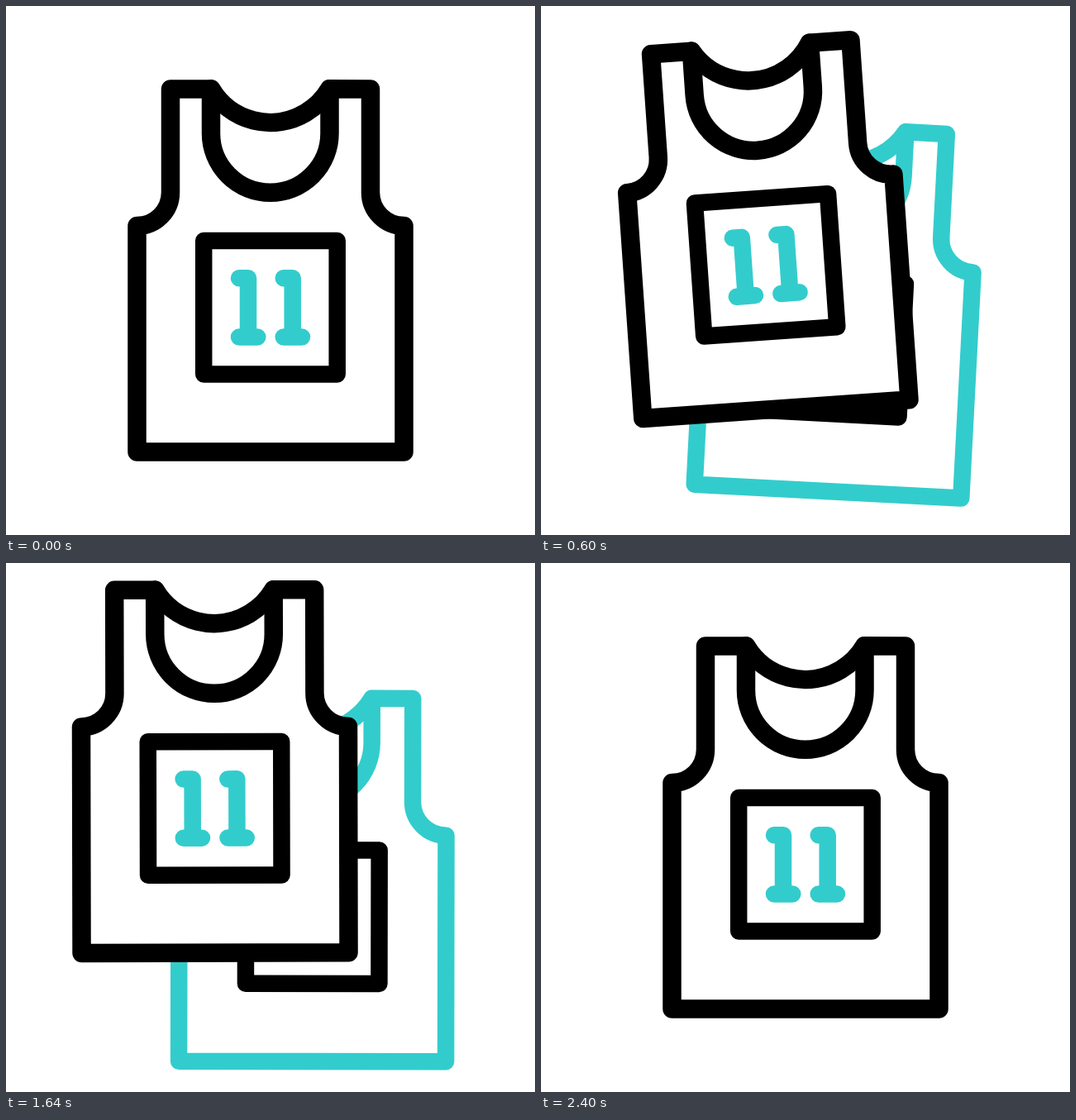
Animation of 640 by 640 pixels, one loop 2.8 s. Source, as an HTML page with a canvas:

```html
<!DOCTYPE html>
<html lang="en">
<head>
<meta charset="utf-8">
<title>Jerseys</title>
<style>
  html, body { margin: 0; width: 100%; height: 100%; overflow: hidden; background: #fff; }
  canvas { display: block; width: 100vmin; height: 100vmin; }
</style>
</head>
<body>
<canvas id="stage" width="640" height="640"></canvas>
<script>
const ctx = document.getElementById('stage').getContext('2d');
const TEAL = '#33cccc', BLACK = '#000';
const LOOP = 2800, STEP = 40, START = 200, MOVE = 800;

const front = { dx: -67.5, dy: -68, turn: -4, color: BLACK, width: 22.5, number: true };
const back = { dx: 51, dy: 63.5, turn: 3, color: TEAL, width: 20.5, number: false };

// Neckline: circular arc through both shoulder ends, 41 px deep.
const half = 71.75, depth = 41;
const neckR = (half * half + depth * depth) / (2 * depth);
const neckY = 141 - neckR;
const neckA = Math.atan2(100.5 - neckY, half);

const body = new Path2D();
body.moveTo(199, 100.5);
body.lineTo(248, 100.5);
body.arc(319.75, neckY, neckR, Math.PI - neckA, neckA, true);
body.lineTo(441, 100.5);
body.lineTo(441, 225.5);
body.arc(481.5, 225.5, 40.5, Math.PI, Math.PI / 2, true);
body.lineTo(481.5, 539.5);
body.lineTo(158.5, 539.5);
body.lineTo(158.5, 266);
body.arc(158.5, 225.5, 40.5, Math.PI / 2, 0, true);
body.closePath();

const collar = new Path2D();
collar.moveTo(248, 100.5);
collar.lineTo(248, 154);
collar.arc(319.75, 154, half, Math.PI, 0, true);
collar.lineTo(391.5, 100.5);

const panel = new Path2D();
panel.rect(239.2, 284, 161.5, 161.5);

const digits = new Path2D();
for (const x of [293, 346.7]) {
  digits.moveTo(x - 11, 329.3);
  digits.lineTo(x, 329.3);
  digits.lineTo(x, 400.5);
  digits.moveTo(x - 11, 400.5);
  digits.lineTo(x + 11.3, 400.5);
}

const smooth = s => s * s * (3 - 2 * s);

// Cubic bezier ease (x1, 0, x2, 1).
function ease(x, x1, x2) {
  let lo = 0, hi = 1;
  for (let i = 0; i < 30; i++) {
    const s = (lo + hi) / 2, r = 1 - s;
    if (3 * r * r * s * x1 + 3 * r * s * s * x2 + s * s * s < x) lo = s;
    else hi = s;
  }
  return smooth(lo);
}

function stroke(path, color, width) {
  ctx.strokeStyle = color;
  ctx.lineWidth = width;
  ctx.stroke(path);
}

function drawJersey(j, shift, tilt) {
  ctx.save();
  ctx.translate(320 + j.dx * shift, 320 + j.dy * shift);
  ctx.rotate(j.turn * tilt * Math.PI / 180);
  ctx.translate(-320, -320);
  ctx.fillStyle = '#fff';
  ctx.fill(body);
  stroke(collar, j.color, j.width);
  stroke(body, j.color, j.width);
  stroke(panel, BLACK, 20.5);
  if (j.number) stroke(digits, TEAL, 20.5);
  ctx.restore();
}

function draw(ms) {
  const t = Math.floor((ms % LOOP) / STEP) * STEP;
  const u = Math.min(t, 2600 - t); // the way back mirrors the way out
  const k = Math.min(1, Math.max(0, (u - START) / MOVE));
  const shift = k < 1 ? ease(k, 0.34, 0.265) : 1;
  const tilt = smooth(1 - Math.abs(2 * k - 1));
  ctx.fillStyle = '#fff';
  ctx.fillRect(0, 0, 640, 640);
  ctx.lineJoin = ctx.lineCap = 'round';
  if (k > 0) drawJersey(back, shift, tilt);
  drawJersey(front, shift, tilt);
}

const t0 = performance.now();
function loop() {
  draw(performance.now() - t0);
  requestAnimationFrame(loop);
}
loop();
</script>
</body>
</html>
```
